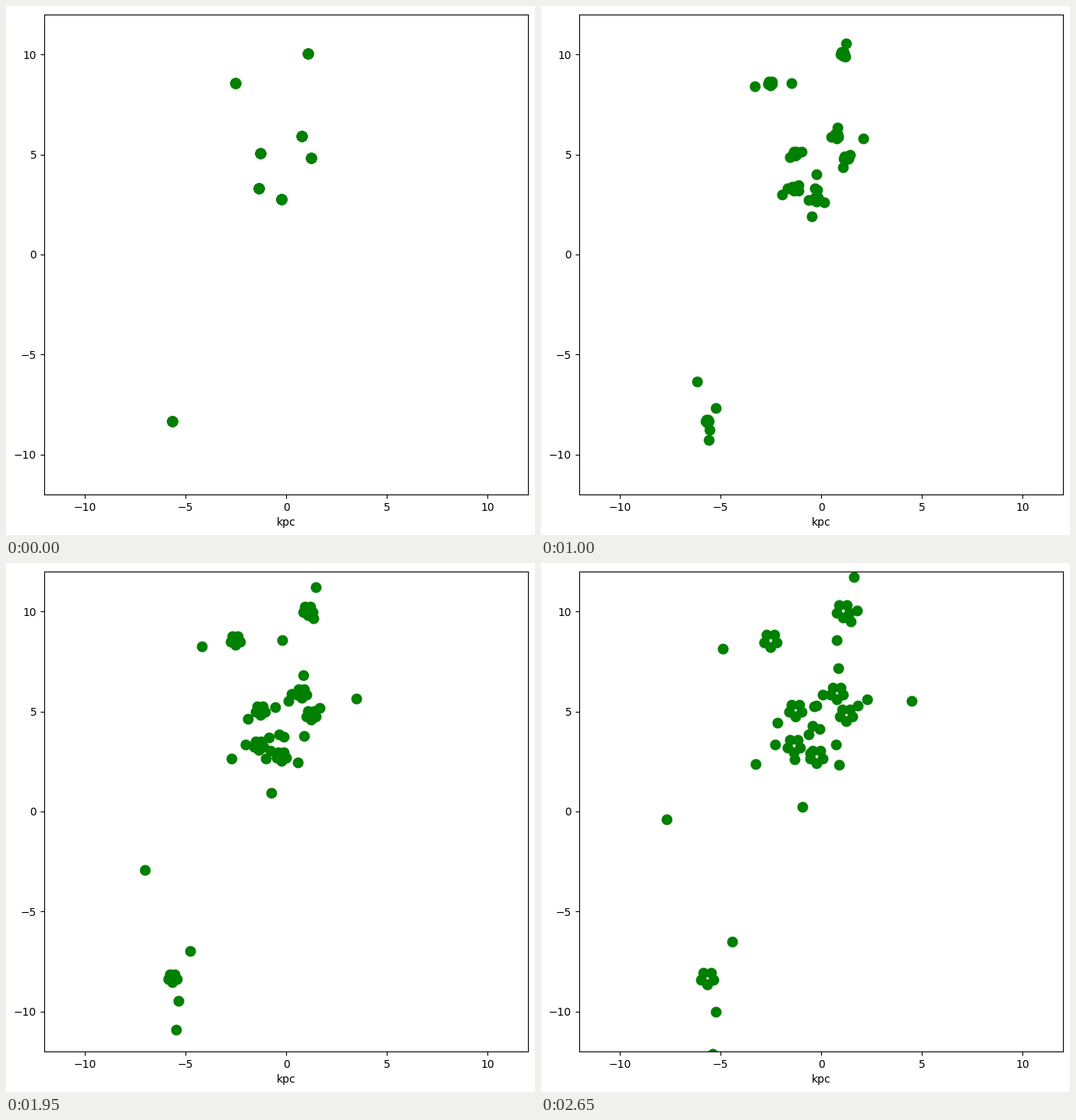
These frames come from a looping animation (678 px wide and 679 px high, 2.7 s). A matplotlib script:

```python
import numpy as np
import matplotlib.pyplot as plt
from matplotlib.animation import FuncAnimation

W, H, DPI = 678, 679, 100
LEFT, BOTTOM, AX_W, AX_H = 49, 52, 620, 616
LIMIT = 12
FRAMES, INTERVAL = 54, 50
LAST = FRAMES - 1

# Complex numbers x + yj hold positions and drifts over one loop, in kpc.
# Slow stars spread from each cluster as a pentagon that points down.
SLOW = 0.33 * np.exp(1j * np.radians(np.arange(5) * 72 - 90))

# Home, frame of ejection, drifts of the fast stars
CLUSTERS = [
    (1.08 + 10.05j, 6, [0.54 + 1.69j, 0.39 - 0.55j]),
    (-2.52 + 8.57j, 4.5, [-2.36 - 0.43j, 3.29 + 0.02j]),
    (0.76 + 5.93j, 2, [3.74 - 0.4j, 0.1 + 1.24j, -0.68 - 0.09j]),
    (1.24 + 4.84j, 4.5, [-0.5 - 1.49j, 0.58 + 0.47j]),
    (-1.28 + 5.07j, 5, [1.06 + 0.22j, -0.89 - 0.63j]),
    (-1.36 + 3.31j, 5, [3.64 + 2.29j, 0.74 + 0.55j, -1.9 - 0.93j,
                        0.81 - 0.38j, -0.93 + 0.05j]),
    (-0.24 + 2.76j, 2.5, [-0.17 + 1.54j, 0.17 + 1.38j, -0.68 - 2.51j,
                          1.14 - 0.41j, -1.06 - 0.14j]),
    (-5.65 - 8.32j, 9, [-2.01 + 7.94j, 0.43 - 1.71j, 0.27 - 3.78j]),
]

# Single stars that leave a cluster at another time
STRAYS = [
    (CLUSTERS[0][0], 42, 0.7 + 0.02j),
    (CLUSTERS[2][0], 18, -1.1 - 0.67j),
    (CLUSTERS[7][0], 2, 1.24 + 1.83j),
]

stars = [(home, start, drift) for home, start, fast in CLUSTERS
         for drift in [*fast, *SLOW]] + STRAYS
homes, starts, drifts = np.array(stars).T
starts = starts.real

fig = plt.figure(figsize=(W / DPI, H / DPI), dpi=DPI, facecolor="white")
ax = fig.add_axes([LEFT / W, BOTTOM / H, AX_W / W, AX_H / H])
ax.set_xlim(-LIMIT, LIMIT)
ax.set_ylim(-LIMIT, LIMIT)
ax.set_xticks(range(-10, 11, 5))
ax.set_yticks(range(-10, 11, 5))
ax.set_xlabel("kpc")
dots, = ax.plot([], [], "o", color="green", markersize=9)


def update(frame):
    """Stars rest until they are ejected, then move at constant speed."""
    progress = np.clip((frame - starts) / (LAST - starts), 0, 1)
    place = homes + drifts * progress
    dots.set_data(place.real, place.imag)
    return dots,


anim = FuncAnimation(fig, update, frames=FRAMES, interval=INTERVAL,
                     repeat=True, repeat_delay=0)
plt.show()
```
